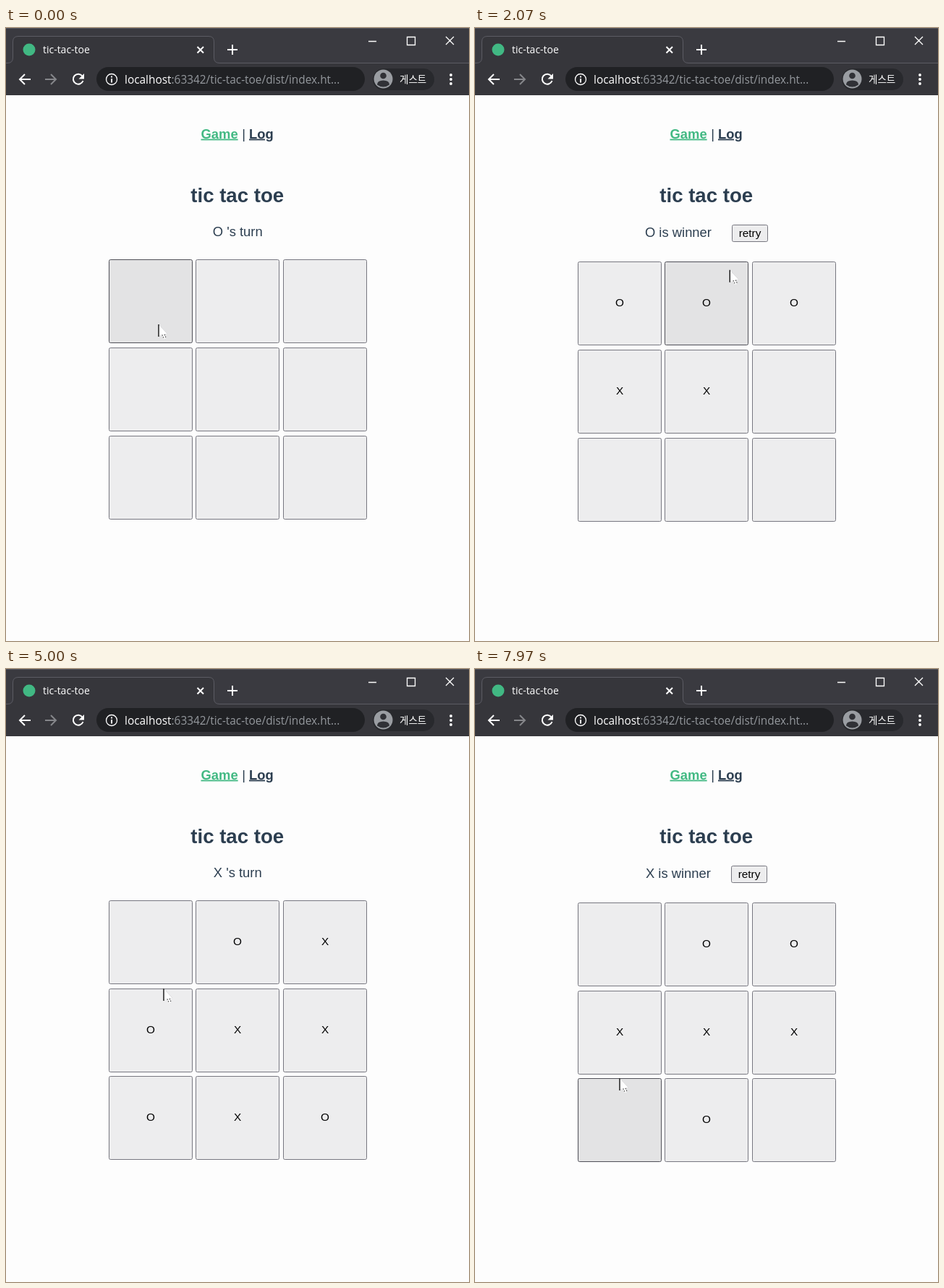
An HTML page for the animation above (8 s loop, 640 by 848 pixels).

```html
<!DOCTYPE html>
<html lang="en">
<head>
<meta charset="utf-8">
<title>tic-tac-toe</title>
<style>
  html, body { margin: 0; width: 100%; height: 100%; overflow: hidden; background: #fdfdfd; }
  svg { display: block; width: 100%; height: 100%; }
  text { white-space: pre; }
  .ui { font-family: "Open Sans", "Noto Sans", sans-serif; }
  .ko { font: 500 13.5px "Noto Sans CJK KR", "Noto Sans CJK", sans-serif; }
  .page { font: 18.4px "Liberation Sans", Arial, sans-serif; fill: #2c3e50; }
  .nav { font-weight: bold; text-decoration: underline; }
  .head { font-weight: bold; font-size: 27.6px; text-anchor: middle; }
  .btn rect { fill: #ededee; stroke: #777780; }
  .btn.hover rect { fill: #e3e3e4; stroke: #505058; }
  .btn.active rect { fill: #f5f5f6; stroke: #8e8e96; }
  .btn text { font: 15.33px "Liberation Sans", Arial, sans-serif; text-anchor: middle; fill: #000; }
  .line { fill: none; stroke: #fff; stroke-width: 1.3; }
  .icon { fill: none; stroke: #fff; stroke-width: 2; }
</style>
</head>
<body>
<svg viewBox="0 0 640 848">
  <rect width="640" height="848" fill="#fdfdfd"/>

  <g class="ui">
    <rect width="640" height="93" fill="#3a3a40"/>
    <path d="M0 .5H640" stroke="#55555e"/>
    <path d="M0 48.5H2Q9.5 48.5 9.5 41V19Q9.5 11.5 17 11.5H280Q287.5 11.5 287.5 19V41Q287.5 48.5 295 48.5H640V93H0Z" fill="#36363b"/>
    <path d="M0 48.5H2Q9.5 48.5 9.5 41V19Q9.5 11.5 17 11.5H280Q287.5 11.5 287.5 19V41Q287.5 48.5 295 48.5H640" fill="none" stroke="#5c5c64"/>
    <circle cx="32" cy="30" r="8.5" fill="#41b883"/>
    <text x="51" y="35" font-size="14" fill="#fff">tic-tac-toe</text>
    <path class="icon" d="M264.5 26l8.5 8.5m0-8.5l-8.5 8.5"/>
    <path class="icon" d="M306 30h14m-7-7v14"/>
    <path class="line" d="M501 18.5h11M554.5 12.5h11v11h-11ZM608 12l11 11m0-11l-11 11"/>

    <path class="icon" d="M34 71H19m7-7l-7 7 7 7"/>
    <path class="icon" d="M54 71h15m-7-7l7 7-7 7" style="stroke:#85868a"/>
    <path class="icon" d="M105.5 66.5A7 7 0 1 0 106.5 73"/>
    <path d="M108 63v7.5h-7.5Z" fill="#fff"/>

    <rect x="125" y="54" width="371" height="33" rx="16.5" fill="#202124"/>
    <circle class="line" cx="146" cy="71" r="7.5"/>
    <path class="icon" d="M146 66.5v2m0 1.5v5.5"/>
    <text x="164" y="76.5" font-size="15.4" fill="#94989d"><tspan fill="#fff">localhost</tspan>:63342/tic-tac-toe/dist/index.ht...</text>

    <rect x="507" y="56" width="85" height="30" rx="15" fill="#28292d"/>
    <circle cx="521.5" cy="70.5" r="13" fill="#9a9da2"/>
    <g fill="#303136">
      <circle cx="521.5" cy="66" r="4.3"/>
      <path d="M513 78.5Q513 72.5 521.5 72.5T530 78.5Q526 81.5 521.5 81.5T513 78.5Z"/>
    </g>
    <text class="ko" x="544" y="75.5" fill="#fff">게스트</text>
    <path d="M615 65h0m0 6h0m0 6h0" stroke="#fff" stroke-width="3.8" stroke-linecap="round"/>
  </g>

  <g class="page">
    <text class="nav" x="269.5" y="152.5" fill="#42b983">Game</text>
    <text x="326.2" y="152.5">|</text>
    <text class="nav" x="336" y="152.5">Log</text>
    <text class="head" x="319.7" y="240.5">tic tac toe</text>
    <text id="status"></text>
    <g id="retry" class="btn">
      <rect x=".5" y=".5" width="49" height="23" rx="2"/>
      <text x="25" y="17">retry</text>
    </g>
    <g id="board"></g>
  </g>

  <g id="cursor">
    <path d="M0 0V17L4 13.5 7 20 10 19 7.5 13H12Z" fill="#fff"/>
    <path d="M0 0L12 13" stroke="#d6d6d8" stroke-width=".8"/>
    <path d="M0 0V17" stroke="#111" stroke-width="1.4"/>
    <path d="M5 14.5L7.5 20M8 14L10.5 19.5" stroke="#444" stroke-width="1.2" stroke-dasharray="1.5 1.5"/>
  </g>
</svg>
<script>
const LOOP = 8000, PRESS = 80, RETRY = 9;
const SVG = "http://www.w3.org/2000/svg";
const $ = id => document.getElementById(id);

// Each round: cells in clicking order, first click, pace, and click on retry.
const rounds = [
  { order: "03241", first: 150, pace: 270, retry: 2560 },
  { order: "517348260", first: 2996, pace: 194, retry: 6200 },
  { order: "137425", first: 6578, pace: 190 }
];
// Places the pointer passes on its way.
const poses = [
  [0, 211, 410], [1170, 289, 512], [3150, 334, 403], [4030, 354, 557],
  [5000, 218, 442], [6960, 330, 596], [7970, 200, 566], [LOOP, 200, 566]
].map(([t, x, y]) => ({ t, x, y }));

const lines = ["012", "345", "678", "036", "147", "258", "048", "246"];
const col = i => i % 3, row = i => Math.floor(i / 3);
const cellX = i => Math.round(141.5 + 120.5 * col(i));
const cellY = i => 320 + 122 * row(i);
const center = i => i === RETRY ? { x: 380, y: 287 } : { x: cellX(i) + 58, y: cellY(i) + 58 };
const mix = (a, b, k) => a + (b - a) * k;

// Clicks slow down a little during a round.
const clicks = rounds.flatMap(({ order, first, pace, retry }) => [
  ...[...order].map((c, k) => ({ t: first + pace * k ** 1.15, hit: +c })),
  ...(retry ? [{ t: retry, hit: RETRY }] : [])
]);

// The pointer stops a little short of each target's center.
const stops = [...poses, ...clicks].sort((a, b) => a.t - b.t);
stops.forEach((s, i) => {
  if (s.hit === undefined) return;
  const from = stops[i - 1], to = center(s.hit), short = s.hit === RETRY ? 0 : .15;
  s.x = mix(to.x, from.x, short);
  s.y = mix(to.y, from.y, short);
});

function el(tag, attrs, parent) {
  const node = document.createElementNS(SVG, tag);
  for (const k in attrs) node.setAttribute(k, attrs[k]);
  return parent.appendChild(node);
}

const cells = Array.from({ length: 9 }, () => {
  const g = el("g", { class: "btn" }, $("board"));
  el("rect", { x: .5, y: .5, width: 115, height: 115, rx: 2 }, g);
  return { g, label: el("text", { x: 58, y: 62 }, g) };
});

function gameAt(t) {
  const marks = Array(9).fill("");
  let turn = "O", winner = "";
  for (const { hit } of clicks.filter(c => c.t <= t)) {
    if (hit === RETRY) {
      marks.fill("");
      winner = "";
      continue;
    }
    marks[hit] = turn;
    if (lines.some(l => [...l].every(i => marks[i] === turn))) winner = turn;
    turn = turn === "O" ? "X" : "O";
  }
  return { marks, turn, winner, over: !!winner || marks.every(Boolean) };
}

function pointerAt(t) {
  const n = stops.findIndex(s => s.t > t), a = stops[n - 1], b = stops[n];
  const u = (t - a.t) / (b.t - a.t), k = u * u * (3 - 2 * u);
  const down = clicks.some(c => t < c.t && t >= c.t - PRESS);
  return { x: mix(a.x, b.x, k), y: mix(a.y, b.y, k), down };
}

function place(g, x, y, w, h, p) {
  const over = p.x >= x && p.x < x + w && p.y >= y && p.y < y + h;
  g.setAttribute("transform", `translate(${x} ${y})`);
  g.setAttribute("class", "btn" + (over ? p.down ? " active" : " hover" : ""));
}

function draw(t) {
  const { marks, turn, winner, over } = gameAt(t);
  const p = pointerAt(t), status = $("status");

  status.textContent = winner ? winner + " is winner" : over ? "draw" : turn + " 's turn";
  const w = status.getComputedTextLength();
  const x = 320.2 - (w + (over ? 78.5 : 0)) / 2;
  status.setAttribute("x", x);
  status.setAttribute("y", over ? 288.5 : 287.5);
  $("retry").style.display = over ? "" : "none";
  place($("retry"), Math.round(x + w + 28.5), 272, 50, 24, p);

  // The retry button pushes the board down; marks pull the last row up.
  const push = over ? 3 : 0, pull = marks.slice(6).some(Boolean) ? 1 : 0;
  cells.forEach(({ g, label }, i) => {
    const y = cellY(i) + push - (row(i) === 2 ? pull : 0);
    place(g, cellX(i), y, 116, 116, p);
    label.textContent = marks[i];
  });
  $("cursor").setAttribute("transform", `translate(${p.x} ${p.y})`);
}

const start = performance.now();
function tick() {
  draw((performance.now() - start) % LOOP);
  requestAnimationFrame(tick);
}
tick();
</script>
</body>
</html>
```
